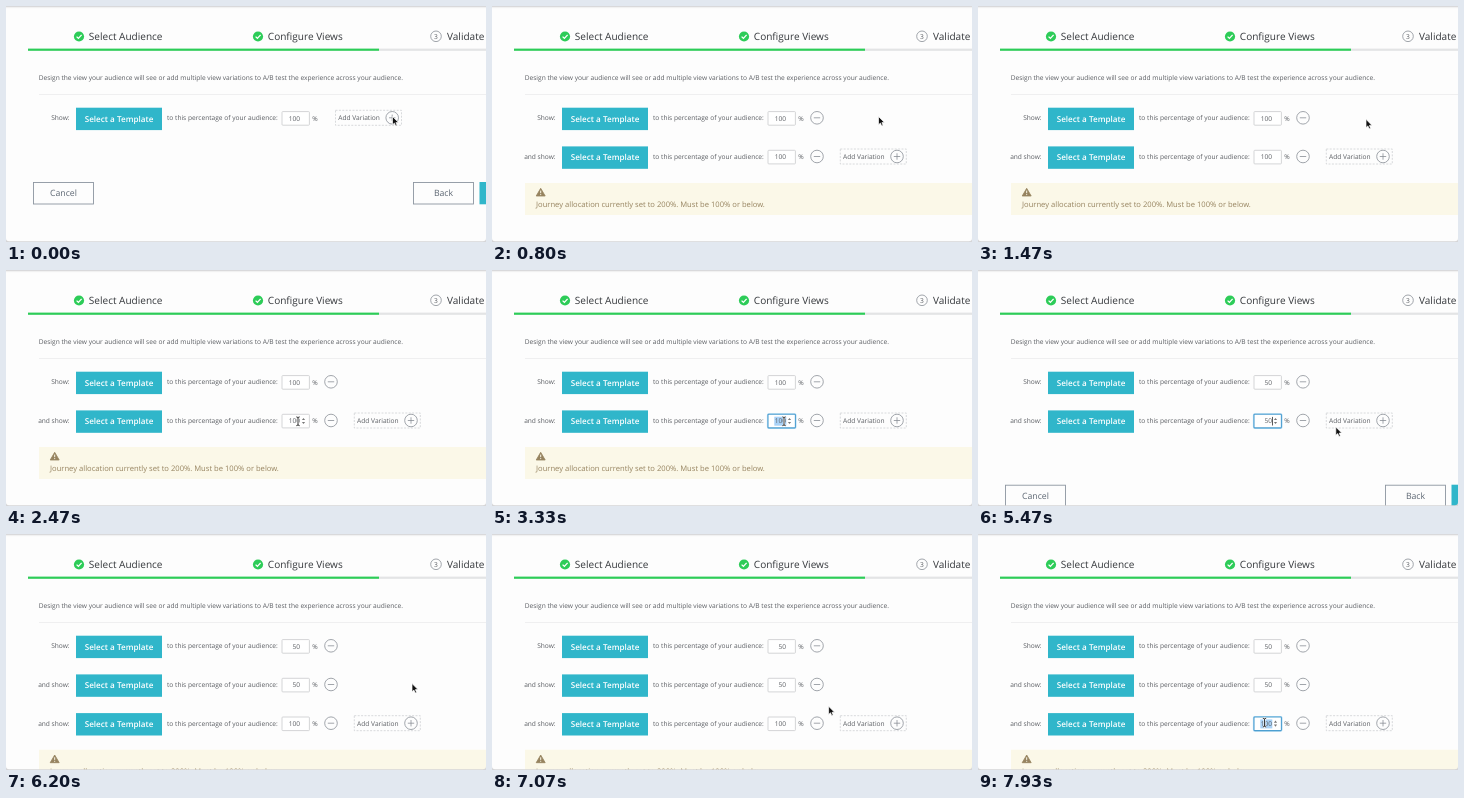
These frames come from a looping animation (480x236 px, 8000 ms). An HTML page:

```html
<!DOCTYPE html>
<html lang="en">
<head>
<meta charset="utf-8">
<title>Configure views</title>
<style>
html, body { margin: 0; width: 100%; height: 100%; overflow: hidden; background: #fdfdfd; }
svg { display: block; width: 100vw; height: 100vh; }
text { font-family: "Open Sans", "Noto Sans", sans-serif; font-size: 6.62px; fill: #5b5e63; text-rendering: geometricPrecision; white-space: pre; }
.step { font-size: 10.05px; fill: #34373b; }
.cta { font-size: 8.13px; font-weight: 600; fill: #fff; text-anchor: middle; }
.nav { font-size: 8.7px; fill: #5c6672; text-anchor: middle; }
.warn { font-size: 7.62px; fill: #96835f; }
.end { text-anchor: end; }
.box { fill: #fff; stroke: #c9cbcd; stroke-width: .8; }
.focus .box { stroke: #4d9fd0; stroke-width: 1.1; }
.halo { fill: none; stroke: #8cc8ee; stroke-width: 2.2; opacity: 0; }
.focus .halo { opacity: .65; }
.ring { fill: none; stroke: #8b9097; stroke-width: .8; }
.navbox { fill: #fdfdfd; stroke: #8d96a0; stroke-width: .9; }
</style>
</head>
<body>
<svg id="stage" viewBox="0 0 480 236" preserveAspectRatio="none"></svg>
<script>
const LOOP = 8000, PITCH = 38.7;
const stage = document.getElementById('stage');

function el(tag, attrs, parent = stage, label) {
  const n = document.createElementNS('http://www.w3.org/2000/svg', tag);
  for (const k in attrs) n.setAttribute(k, attrs[k]);
  if (label !== undefined) n.textContent = label;
  parent.appendChild(n);
  return n;
}
const rect = (x, y, width, height, attrs, parent) => el('rect', { x, y, width, height, ...attrs }, parent);
const text = (x, y, label, cls, parent) => el('text', { x, y, class: cls }, parent, label);
const path = (d, attrs, parent) => el('path', { d, ...attrs }, parent);
const circle = (cx, cy, r, attrs, parent) => el('circle', { cx, cy, r, ...attrs }, parent);
const show = (node, on) => node.setAttribute('visibility', on ? 'visible' : 'hidden');
const shift = (node, x, y) => node.setAttribute('transform', `translate(${x} ${y})`);

// Page header
rect(0, 0, 480, 236, { fill: '#fdfdfd' });
rect(0, 0, 480, 1.2, { fill: '#d9d9db' });
rect(0, 1.2, 480, 1, { fill: '#f0f0f1' });
rect(22, 42.6, 351, 2.2, { fill: '#2dcc58' });
rect(373, 42.6, 107, 2.2, { fill: '#e3e4e5' });
for (const [x, label] of [[73, 'Select Audience'], [252, 'Configure Views']]) {
  circle(x, 30.5, 5.1, { fill: '#2dcc58' });
  path(`M${x - 2.4} 30.6l1.8 1.8l3.2-3.5`, { fill: 'none', stroke: '#fff', 'stroke-width': 1.3 });
  text(x + 9.8, 34, label, 'step');
}
circle(430, 30.3, 5.3, { class: 'ring' });
el('text', { x: 430, y: 32.8, 'text-anchor': 'middle' }, stage, '3');
text(441, 34, 'Validate', 'step');
text(32.7, 74.3, 'Design the view your audience will see or add multiple view variations to A/B test the experience across your audience.');
rect(33, 88, 447, .8, { fill: '#ededee' });

// Cancel / Back / Next
const footer = el('g', {});
rect(27.5, 176.5, 60, 21.5, { class: 'navbox' }, footer);
text(57.5, 190.2, 'Cancel', 'nav', footer);
rect(407.5, 176.5, 60, 21.5, { class: 'navbox' }, footer);
text(437.5, 190.2, 'Back', 'nav', footer);
rect(473.5, 176, 7, 22.3, { fill: '#30b6ca' }, footer);

const alertBox = el('g', {});
rect(33, 177, 447, 32, { fill: '#fbf8e8' }, alertBox);
path('M48.7 182.3L53.2 190H44.2Z', { fill: '#96835f', stroke: '#96835f', 'stroke-width': .8, 'stroke-linejoin': 'round' }, alertBox);
path('M48.7 184.6v2.6M48.7 188.1v1', { stroke: '#fbf8e8', 'stroke-width': 1 }, alertBox);
text(44, 201.4, 'Journey allocation currently set to 200%. Must be 100% or below.', 'warn', alertBox);

function makeRow(i) {
  const g = el('g', { transform: `translate(0 ${i * PITCH})` });
  text(63.6, 114.4, i ? 'and show:' : 'Show:', 'end', g);
  rect(70, 101.7, 86, 22.4, { fill: '#30b6ca' }, g);
  text(113, 115.8, 'Select a Template', 'cta', g);
  text(161, 114.4, 'to this percentage of your audience:', '', g);
  const field = el('g', {}, g);
  const frame = { x: 276, y: 105.6, width: 27.4, height: 13.6, rx: .8 };
  el('rect', { ...frame, class: 'halo' }, field);
  el('rect', { ...frame, class: 'box' }, field);
  const mark = rect(282.3, 108, 12, 9, { fill: '#a9d2f7' }, field);
  const value = text(294, 114.5, '', 'end', field);
  const caret = rect(294.2, 108.2, .8, 8.6, { fill: '#333' }, field);
  const spin = path('M295.9 111.4l1.6-2.2l1.6 2.2zM295.9 113.2l1.6 2.2l1.6-2.2z', { fill: '#777' }, field);
  text(306.3, 114.5, '%', '', g);
  const minus = el('g', {}, g);
  circle(325, 111.8, 6.3, { class: 'ring' }, minus);
  path('M321.8 111.8h6.4', { class: 'ring' }, minus);
  return { g, field, mark, value, caret, spin, minus };
}
const rows = [0, 1, 2].map(makeRow);

const add = el('g', {});
rect(329.5, 104.3, 66, 15, { fill: 'none', stroke: '#cfd1d4', 'stroke-width': .8, 'stroke-dasharray': '2 1.4' }, add);
text(332.3, 114.4, 'Add Variation', '', add);
circle(386.2, 111.8, 6.3, { class: 'ring' }, add);
path('M383 111.8h6.4M386.2 108.6v6.4', { class: 'ring' }, add);

// Lower window edge
path('M0 232V236H480V232Q480 235.2 476.8 235.2H3.2Q0 235.2 0 232Z', { fill: '#d6d6d8' });

const arrow = path('M0 0V8.3L1.9 6.6L3.2 9.5L4.6 8.9L3.4 6.1H6Z', { fill: '#111', stroke: '#fff', 'stroke-width': .7 });
const beam = el('g', {});
const beamPath = 'M-1.7-4.4Q0-4.4 0-3.2Q0-4.4 1.7-4.4M0-3.4V3.4M-1.7 4.4Q0 4.4 0 3.2Q0 4.4 1.7 4.4';
path(beamPath, { fill: 'none', stroke: '#fff', 'stroke-width': 2 }, beam);
path(beamPath, { fill: 'none', stroke: '#222', 'stroke-width': .9 }, beam);

// Pointer stops: time, x, y
const stops = [
  [0, 386.5, 110.5], [900, 386.5, 110.5], [1200, 388, 113.3], [1800, 388, 113.3],
  [2400, 292, 151.3], [4870, 292, 151.3], [5430, 357.8, 157], [5490, 357.8, 157],
  [5700, 389, 151], [5930, 406, 149.5], [6600, 406, 149.5], [7450, 286.5, 188.6], [LOOP, 286.5, 188.6]
];
// States: from time, values, focused row, mode
const states = [
  [0, [100], -1, ''],
  [300, [100, 100], -1, ''],
  [2730, [100, 100], 1, 'mark'],
  [3600, [95, 5], 1, 'caret'],
  [4420, [50, 50], 1, 'caret'],
  [6070, [50, 50, 100], -1, ''],
  [7790, [50, 50, 100], 2, 'mark']
];

function pointer(t) {
  const i = Math.max(1, stops.findIndex(s => s[0] > t));
  const [t0, x0, y0] = stops[i - 1], [t1, x1, y1] = stops[i];
  const p = (t - t0) / (t1 - t0), e = p * p * (3 - 2 * p);
  return [x0 + (x1 - x0) * e, y0 + (y1 - y0) * e];
}

function draw(t) {
  const [since, values, focus, mode] = states.filter(s => s[0] <= t).pop();
  const [x, y] = pointer(t);
  const count = values.length, drop = (count - 1) * PITCH;
  const over = values.reduce((a, b) => a + b) > 100;
  let typing = false;
  rows.forEach((r, i) => {
    const on = i < count, top = 105.6 + i * PITCH;
    const hover = on && x > 276 && x < 303.4 && y > top && y < top + 13.6;
    const active = on && i === focus;
    typing = typing || hover;
    r.g.style.display = on ? '' : 'none';
    r.value.textContent = on ? values[i] : '';
    r.field.setAttribute('class', active ? 'focus' : '');
    show(r.minus, on && count > 1);
    show(r.spin, hover || active);
    show(r.mark, active && mode === 'mark');
    show(r.caret, active && mode === 'caret' && (t - since) % 1000 < 500);
  });
  shift(add, count > 1 ? 18.8 : 0, drop);
  shift(alertBox, 0, drop - PITCH);
  show(alertBox, over);
  shift(footer, 0, drop + (over ? 42 : 0));
  shift(arrow, x, y);
  shift(beam, x, y);
  show(arrow, !typing);
  show(beam, typing);
}

const start = performance.now();
function tick() {
  draw((performance.now() - start) % LOOP);
  requestAnimationFrame(tick);
}
tick();
</script>
</body>
</html>
```
